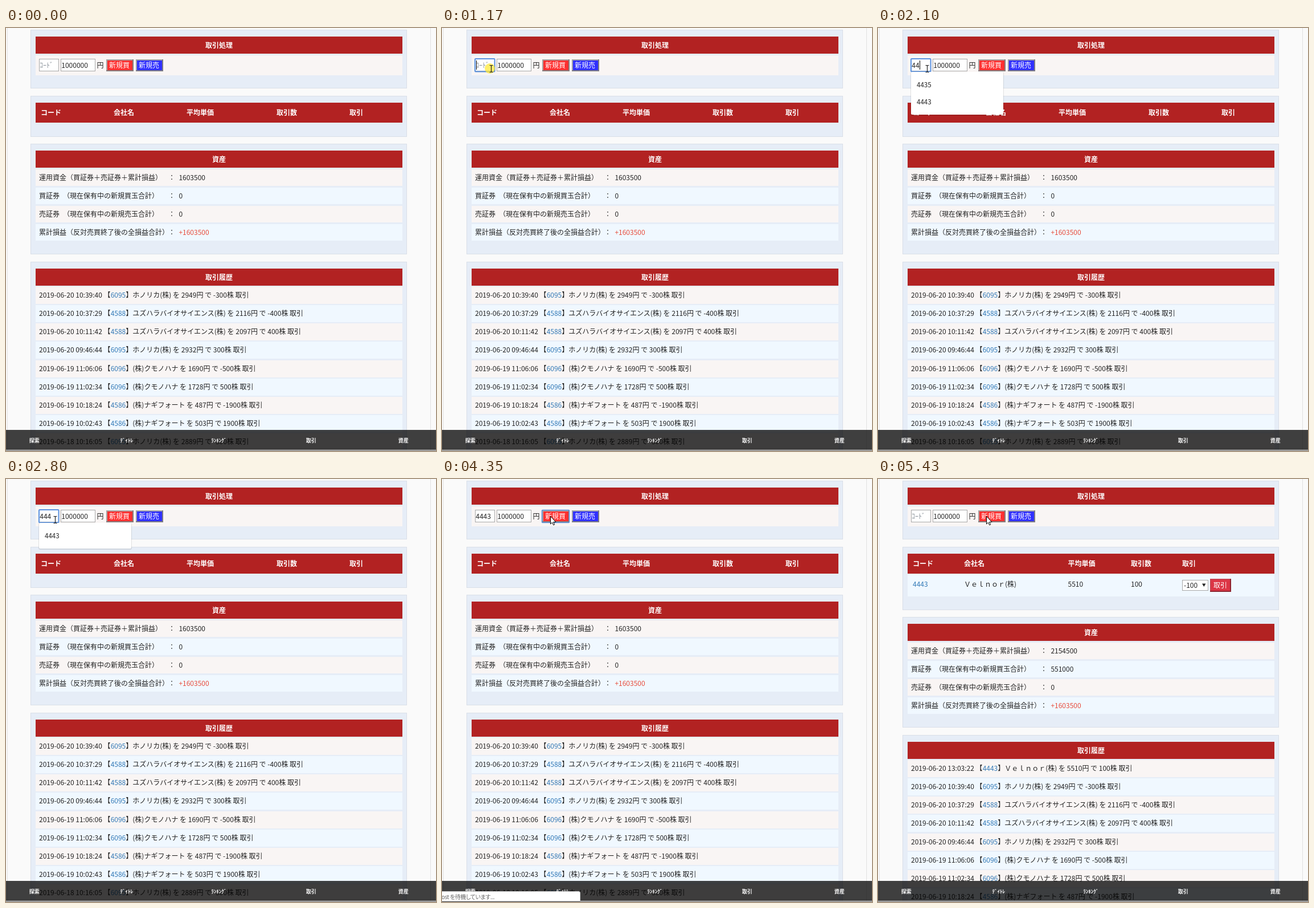
These frames come from a looping animation (755 by 742 pixels, 8 s). An HTML page:

```html
<!DOCTYPE html>
<html lang="ja">
<head>
<meta charset="utf-8">
<title>取引</title>
<style>
html, body { margin: 0; width: 100%; height: 100%; overflow: hidden; background: #fafafa; }
svg { display: block; width: 755px; height: 742px; font-family: "Noto Sans CJK JP", "Noto Sans CJK", "Noto Sans", sans-serif; }
text { white-space: pre; }
</style>
</head>
<body>
<svg id="stage" viewBox="0 0 755 742"></svg>
<script>
const NS = 'http://www.w3.org/2000/svg';
const stage = document.getElementById('stage');
const INK = '#222', LINK = '#337ab7', HEAD = '#b22222', FOCUS = '#5b92e0';
const WARM = '#f9f5f4', COOL = '#f0f8ff';
const LOOP = 8000;

function add(parent, tag, attrs, content) {
  const el = document.createElementNS(NS, tag);
  for (const k in attrs) el.setAttribute(k, attrs[k]);
  if (content !== undefined) el.textContent = content;
  parent.appendChild(el);
  return el;
}
const group = (parent = stage) => add(parent, 'g', {});
const rect = (p, x, y, width, height, fill, more) => add(p, 'rect', { x, y, width, height, fill, ...more });
const frame = (p, x, y, w, h, fill, stroke) => rect(p, x + .5, y + .5, w - 1, h - 1, fill, { stroke });
const path = (p, d, more) => add(p, 'path', { d, ...more });
const show = (el, on) => el.setAttribute('visibility', on ? 'visible' : 'hidden');

// Text placed by its vertical centre
function label(p, x, cy, str, more = {}) {
  const size = more['font-size'] || 12;
  return add(p, 'text', { x, y: cy + size * .37, 'font-size': size, fill: INK, ...more }, str);
}
const bold = (p, x, cy, str, more) => label(p, x, cy, str, { fill: '#fff', 'font-weight': 700, ...more });

function panel(p, y, h) {
  frame(p, 43, y, 661, h, '#e6edf7', '#d9dfe8');
}
function titled(p, y, h, title) {
  panel(p, y, h);
  rect(p, 52, y + 12, 644, 30, HEAD);
  bold(p, 374, y + 27.5, title, { 'text-anchor': 'middle' });
}
function bevel(p, x, y, w, h, fill, light, dark) {
  rect(p, x, y, w, h, fill);
  path(p, `M${x + 1} ${y + h}V${y + 1}H${x + w}`, { fill: 'none', stroke: light, 'stroke-width': 2 });
  path(p, `M${x} ${y + h - 1}H${x + w - 1}V${y}`, { fill: 'none', stroke: dark, 'stroke-width': 2 });
}

const MED = 'ホノリカ(株)', BIO = 'ユズハラバイオサイエンス(株)';
const JOB = '(株)クモノハナ', LEX = '(株)ナギフォート', NEW = 'Ｖｅｌｎｏｒ(株)';
const trades = [
  ['20 13:03:22', 4443, NEW, 5510, 100],
  ['20 10:39:40', 6095, MED, 2949, -300],
  ['20 10:37:29', 4588, BIO, 2116, -400],
  ['20 10:11:42', 4588, BIO, 2097, 400],
  ['20 09:46:44', 6095, MED, 2932, 300],
  ['19 11:06:06', 6096, JOB, 1690, -500],
  ['19 11:02:34', 6096, JOB, 1728, 500],
  ['19 10:18:24', 4586, LEX, 487, -1900],
  ['19 10:02:43', 4586, LEX, 503, 1900],
  ['18 10:16:05', 6095, MED, 2889, -300]
];

function history(p, top, list) {
  titled(p, top, 400, '取引履歴');
  list.forEach(([when, code, name, price, qty], i) => {
    const cy = Math.round(top + 59 + 32.15 * i);
    rect(p, 52, cy - 15, 644, 30, i % 2 ? COOL : WARM);
    const row = label(p, 58, cy, '');
    add(row, 'tspan', {}, `2019-06-${when} 【`);
    add(row, 'tspan', { fill: LINK }, code);
    add(row, 'tspan', {}, `】${name} を ${price}円 で ${qty}株 取引`);
  });
}

function assets(p, top, fund, long) {
  titled(p, top, 194, '資産');
  [
    ['運用資金（買証券＋売証券＋累計損益）', fund],
    ['買証券　（現在保有中の新規買玉合計）', long],
    ['売証券　（現在保有中の新規売玉合計）', '0'],
    ['累計損益（反対売買終了後の全損益合計）', '+1603500']
  ].forEach(([name, value], i) => {
    const cy = top + 59.5 + 32 * i;
    rect(p, 52, cy - 14.5, 644, 29, i % 2 ? COOL : WARM);
    label(p, 58, cy, name);
    label(p, 285, cy, '：');
    label(p, 303.4, cy, value, { fill: i === 3 ? '#e74c3c' : INK });
  });
}

function holdings(p, h, xs) {
  panel(p, 119, h);
  rect(p, 52, 131, 644, 35, HEAD);
  ['コード', '会社名', '平均単価', '取引数', '取引'].forEach((s, i) => bold(p, xs[i], 149, s));
}

// Page
[2, 745].forEach(x => rect(stage, x, 0, 1, 742, '#e2e2e2'));
titled(stage, 3, 103, '取引処理');
rect(stage, 52, 48, 644, 35, WARM);

const before = group();
holdings(before, 72, [61, 189, 317, 475, 603]);
assets(before, 203, '1603500', '0');
history(before, 410, trades.slice(1));

const after = group();
const cols = [61, 151, 333.5, 444, 534];
holdings(after, 111, cols);
rect(after, 52, 167, 644, 39, COOL);
['4443', NEW, '5510', '100'].forEach((s, i) => label(after, cols[i], 185, s, { fill: i ? INK : LINK }));
frame(after, 534, 177, 46, 19, '#fff', '#a9a9a9');
label(after, 537, 187, '-100');
path(after, 'M569 183.5h6.5l-3.25 5.5z', { fill: '#222' });
bevel(after, 583, 175, 37, 23, '#dc3545', '#c8404e', '#8e2430');
label(after, 589, 187, '取引', { fill: '#fff' });
assets(after, 242, '2154500', '551000');
history(after, 449, trades.slice(0, 8));

// Order form
frame(stage, 58, 54, 35, 22, '#fff', '#a9a9a9');
const fieldFocus = rect(stage, 58, 54, 34.5, 22.5, 'none', { stroke: FOCUS, 'stroke-width': 2, rx: 1 });
const hint = label(stage, 59, 66, 'ｺｰﾄﾞ', { fill: '#8a929a' });
const field = label(stage, 59.3, 66, '');
const caret = rect(stage, 60, 57, 1, 16, '#000');
frame(stage, 96, 54, 61, 22, '#fff', '#a9a9a9');
label(stage, 97.3, 66, '1000000');
label(stage, 159.5, 66, '円');
bevel(stage, 176, 55, 48, 21, '#ff3030', '#a8a0a0', '#857d7d');
const pressed = path(stage, 'M177 76V56H224', { fill: 'none', stroke: '#6a6060', 'stroke-width': 2 });
const buyFocus = rect(stage, 175.5, 54.5, 48, 22, 'none', { stroke: FOCUS, 'stroke-width': 1.5, rx: 1 });
label(stage, 181, 66, '新規買', { fill: '#fff' });
bevel(stage, 228, 55, 48, 21, '#3030ff', '#a0a0a8', '#7d7d85');
label(stage, 233, 66, '新規売', { fill: '#fff' });

// Bottom bar
rect(stage, 0, 705, 755, 35, '#000', { 'fill-opacity': .75 });
rect(stage, 0, 740, 755, 1, '#f2f2f2');
rect(stage, 0, 741, 755, 1, '#555');
['探索', 'ﾃﾞｲﾄﾚ', 'ﾗﾝｷﾝｸﾞ', '取引', '資産'].forEach((s, i) =>
  bold(stage, 49.7 + 162 * i, 723.5, s, { 'font-size': 9, 'text-anchor': 'middle' }));

const status = group();
path(status, 'M-1 723.5H240Q242.5 723.5 242.5 726V740.5H-1Z', { fill: '#fff', stroke: '#c4c4c4' });
label(status, -1, 733, 'ost を待機しています...', {
  'font-size': 10, fill: '#666', 'letter-spacing': -.4, style: 'font-feature-settings:"palt"'
});

// Suggestions
const popup = group();
const shade = rect(popup, 57, 77, 164, 0, '#000', { 'fill-opacity': .1, rx: 3 });
const sheet = rect(popup, 58, 77, 162, 0, '#fff', { rx: 2 });
const items = Array.from({ length: 6 }, (_, i) => label(popup, 68, 100 + 30 * i, '', { 'font-size': 11.5 }));

// Pointer
const glow = add(stage, 'circle', { cx: 84, cy: 71, r: 9, fill: '#ffe838', 'fill-opacity': .75 });
const beam = path(stage, 'M-3-6h2l1 1 1-1h2M0-5V5M-3 6h2l1-1 1 1h2', { fill: 'none', stroke: '#222', 'stroke-width': 1.2 });
const arrow = path(stage, 'M0 0V13.5L3 10.7 5.2 15.3 7.2 14.4 5.1 10H9.4Z', { fill: '#fff', stroke: '#000' });

const typed = [[0, ''], [1930, '4'], [2100, '44'], [2250, '444'], [2950, '4443'], [4970, '']];
const lists = [
  [0, []],
  [1320, [4588, 6095, 6096, 4586, 4435, 4443]],
  [1930, [4588, 4586, 4435, 4443, 4592, 4575]],
  [2100, [4435, 4443]],
  [2250, [4443]],
  [3030, []]
];
const moves = [
  [1080, 86.5, 71.5], [3030, 98.5, 70.5], [3110, 130.5, 68.5], [3340, 175.5, 66.5],
  [3415, 180, 66], [3490, 185, 66], [3565, 188, 66], [3640, 190.5, 65.5]
];
const at = (keys, t) => keys.filter(k => k[0] <= t).pop();
const within = (t, a, b) => t >= a && t < b;

function pointer(t) {
  if (t >= 1080) return at(moves, t).slice(1);
  const p = Math.floor((t - 300) / 78) / 10;
  const e = p * p * (3 - 2 * p);
  return [668 - 581.5 * e, 727 - 655.5 * e];
}

function draw(t) {
  const done = t >= 4970;
  show(before, !done);
  show(after, done);

  const code = at(typed, t)[1];
  field.textContent = code;
  show(hint, !code);
  show(fieldFocus, within(t, 1170, 3810));
  caret.setAttribute('x', Math.round(60 + 6.7 * code.length));
  show(caret, within(t, 1170, 1700) || within(t, 1930, 2800) || within(t, 2950, 3480));
  show(buyFocus, within(t, 3810, 4970));
  show(pressed, within(t, 3810, 3890));

  const list = at(lists, t)[1];
  show(popup, list.length > 0);
  items.forEach((el, i) => { el.textContent = list[i] || ''; });
  sheet.setAttribute('height', 15 + 30 * list.length);
  shade.setAttribute('height', 17 + 30 * list.length);

  show(status, within(t, 4350, 5430));
  status.setAttribute('opacity', t < 5280 ? 1 : t < 5355 ? .66 : .33);

  const [x, y] = pointer(t);
  const isBeam = within(t, 1002, 3415);
  for (const el of [beam, arrow]) el.setAttribute('transform', `translate(${x} ${y})`);
  show(beam, isBeam);
  show(arrow, t >= 300 && !isBeam);
  show(glow, within(t, 1170, 1320));
}

const start = performance.now();
function tick() {
  draw((performance.now() - start) % LOOP);
  requestAnimationFrame(tick);
}
tick();
</script>
</body>
</html>
```
